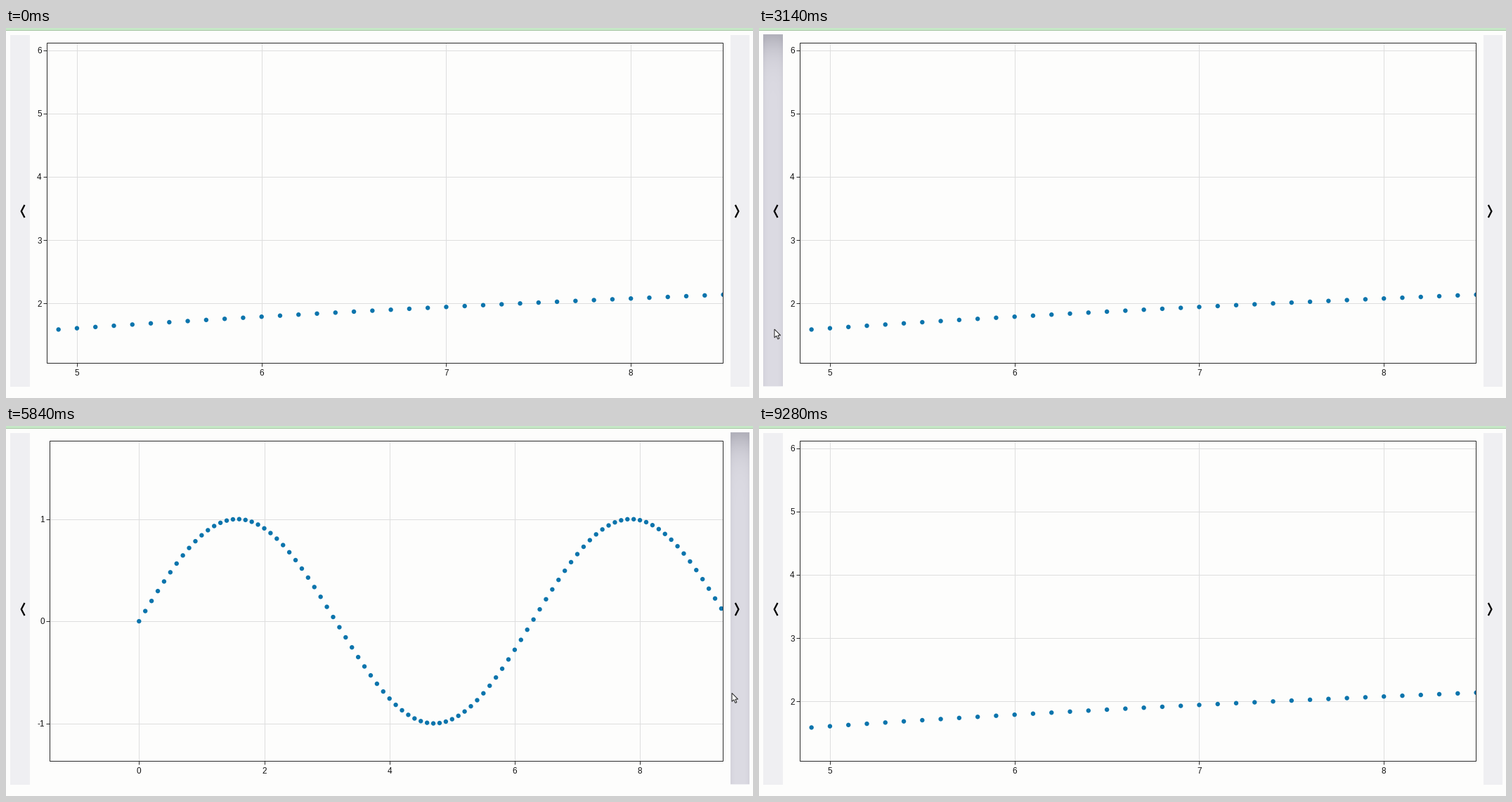
These frames come from a looping animation (1063x527 px, 9.32 s). A matplotlib script:

```python
import numpy as np
import matplotlib.pyplot as plt
from matplotlib.animation import FuncAnimation
from matplotlib.patches import Polygon, Rectangle
from matplotlib.transforms import Affine2D

W, H, DPI = 1063, 527, 100
PT = 72 / DPI                      # points per pixel
STEP, COUNT = 40, 233              # ms per frame, frames per loop
PAGE, INK, DOT, GRID = "#fdfdfc", "#2b2b2b", "#0b74ac", "#dedede"
SLIDE_LEFT, SLIDE_WIDTH = 34, 997
TOP, BOTTOM, RIGHT = 21, 477, 1020

plt.rcParams["font.family"] = "Liberation Sans"
fig = plt.figure(figsize=(W / DPI, H / DPI), dpi=DPI, facecolor=PAGE)
ax = fig.add_axes([0, 0, 1, 1])
ax.axis("off")


def box(x0, y0, x1, y1, color, z, **kw):
    return ax.add_patch(Rectangle((x0, y0), x1 - x0, y1 - y0,
                                  facecolor=color, lw=0, zorder=z, **kw))


class Slide:
    """A chart on an opaque sheet that can be shifted sideways."""

    def __init__(self, z, left, x_axis, y_axis, x_ticks, y_ticks, xs, ys):
        self.shift = Affine2D()
        self.z, self.tr = z, self.shift + ax.transData
        x0, x_unit = x_axis
        y0, y_unit = y_axis
        self.artists = [box(SLIDE_LEFT, 10, SLIDE_LEFT + SLIDE_WIDTH, 510,
                            PAGE, z, transform=self.tr)]
        for v in x_ticks:
            x = x0 + v * x_unit
            self.line([x, x], [TOP, BOTTOM], GRID, 0.1)
            self.line([x, x], [BOTTOM, BOTTOM + 5], INK, 0.3)
            self.label(x, BOTTOM + 17.7, v, "center")
        for v in y_ticks:
            y = y0 - v * y_unit
            self.line([left, RIGHT], [y, y], GRID, 0.1)
            self.line([left - 5, left], [y, y], INK, 0.3)
            self.label(left - 7.3, y + 4.2, v, "right")
        # One size per dot keeps the dots on sub-pixel positions.
        dots = ax.scatter(x0 + xs * x_unit, y0 - ys * y_unit, color=DOT,
                          s=np.full(len(xs), (6.4 * PT) ** 2), linewidths=0,
                          transform=self.tr, zorder=z + 0.2)
        frame = ax.add_patch(Rectangle(
            (left, TOP), RIGHT - left, BOTTOM - TOP, fill=False, ec=INK,
            lw=PT, transform=self.tr, zorder=z + 0.4))
        dots.set_clip_path(frame)
        self.artists += [dots, frame]

    def line(self, xs, ys, color, dz):
        self.artists += ax.plot(xs, ys, color=color, lw=PT, transform=self.tr,
                                zorder=self.z + dz, solid_capstyle="butt")

    def label(self, x, y, value, align):
        self.artists.append(ax.text(
            x, y, f"{value}", ha=align, va="baseline", size=11.7 * PT,
            color="#111111", transform=self.tr, zorder=self.z + 0.3))

    def move(self, dx):
        self.shift.clear().translate(dx, 0)
        for artist in self.artists:
            artist.set_visible(dx < SLIDE_WIDTH)


xs = np.arange(0, 10.01, 0.1)
sine = Slide(1, 62, (189.3, 89.1), (278.1, 145.5),
             range(0, 9, 2), (-1, 0, 1), xs, np.sin(xs))
tangent = Slide(2, 69, (-413.9, 191.7), (313.2, 3.749),
                range(3, 8), range(-25, 76, 25), xs, 2.5 * np.tan(xs))
logarithm = Slide(3, 58, (-1212.8, 262.75), (572.6, 90.08),
                  range(5, 9), range(2, 7), xs[1:], np.log(xs[1:]))

# Page furniture
box(0, 0, W, 3, "#c5e8c6", 6)
box(0, 3, W, 4, "#a9c6a6", 6)
box(1031, 4, W, H, PAGE, 5)

# Hovered bars get an inset shadow, strongest at the top.
BARS = ((6, 33.5), (1031, 1058))
depth = np.arange(500)[:, None, None]
across = np.arange(28)[None, :, None]
side = np.minimum(across, 27 - across)
shade = np.clip(np.exp(-(depth / 26) ** 1.2) + 0.2 * np.exp(-side / 3), 0, 1)
glow = (np.array([220, 219, 227]) * (1 - shade)
        + np.array([178, 177, 187]) * shade) / 255
hovers = []
for x0, x1 in BARS:
    box(x0, 10, x1, 510.5, "#efeff2", 6)
    hovers.append(ax.imshow(glow, extent=(x0, x1, 510.5, 10),
                            aspect="auto", zorder=7))
for tip, back in ((21.8, 26.5), (1042.4, 1037.8)):
    ax.plot([back, tip, back], [252, 261, 270], color="black", lw=2.3 * PT,
            zorder=8, solid_joinstyle="miter", solid_capstyle="butt")

ARROW = np.array([(0, 0), (0, 12), (2.8, 9.4), (4.8, 14), (6.8, 13.2),
                  (4.9, 8.7), (8.6, 8.7)])
cursor = ax.add_patch(Polygon(ARROW, fc="white", ec="#222222", lw=PT, zorder=9))

ax.set_xlim(0, W)
ax.set_ylim(H, 0)

# Pointer path: time in ms, x, y
PATH = np.array([(2300, 70, 530), (2950, 22, 429), (4350, 22, 430),
                 (4870, 773, 379), (5500, 1033, 380), (6310, 1033, 381),
                 (7440, 1035, 389), (8200, 1035, 390), (8500, 1015, 390),
                 (9200, 960, -20)])


def pointer(t):
    i = int(np.clip(np.searchsorted(PATH[:, 0], t) - 1, 0, len(PATH) - 2))
    a, b = PATH[i], PATH[i + 1]
    p = np.clip((t - a[0]) / (b[0] - a[0]), 0, 1)
    return a[1:] + (b[1:] - a[1:]) * p * p * (3 - 2 * p)


s = np.linspace(0, 1, 200)
EASE_X = 0.75 * (1 - s) ** 2 * s + 0.75 * (1 - s) * s ** 2 + s ** 3
EASE_Y = 0.3 * (1 - s) ** 2 * s + 3 * (1 - s) * s ** 2 + s ** 3


def eased(t, start, duration=500):
    return np.interp((t - start) / duration, EASE_X, EASE_Y)


def offset(t, leave, enter):
    return SLIDE_WIDTH * (eased(t, leave) - eased(t, enter))


def draw(k):
    t = (k + 0.5) * STEP
    logarithm.move(offset(t, 3320, 6800))
    tangent.move(offset(t, 3900, 5911))
    tip = pointer(t)
    shown = PATH[0, 0] <= t <= PATH[-1, 0]
    cursor.set_visible(shown)
    cursor.set_xy(ARROW + tip)
    for hover, (x0, x1) in zip(hovers, BARS):
        hover.set_visible(bool(shown and x0 <= tip[0] <= x1
                               and 10 < tip[1] < 511))
    return []


anim = FuncAnimation(fig, draw, frames=COUNT, interval=STEP, repeat=True,
                     init_func=lambda: [], blit=False)
plt.show()
```
